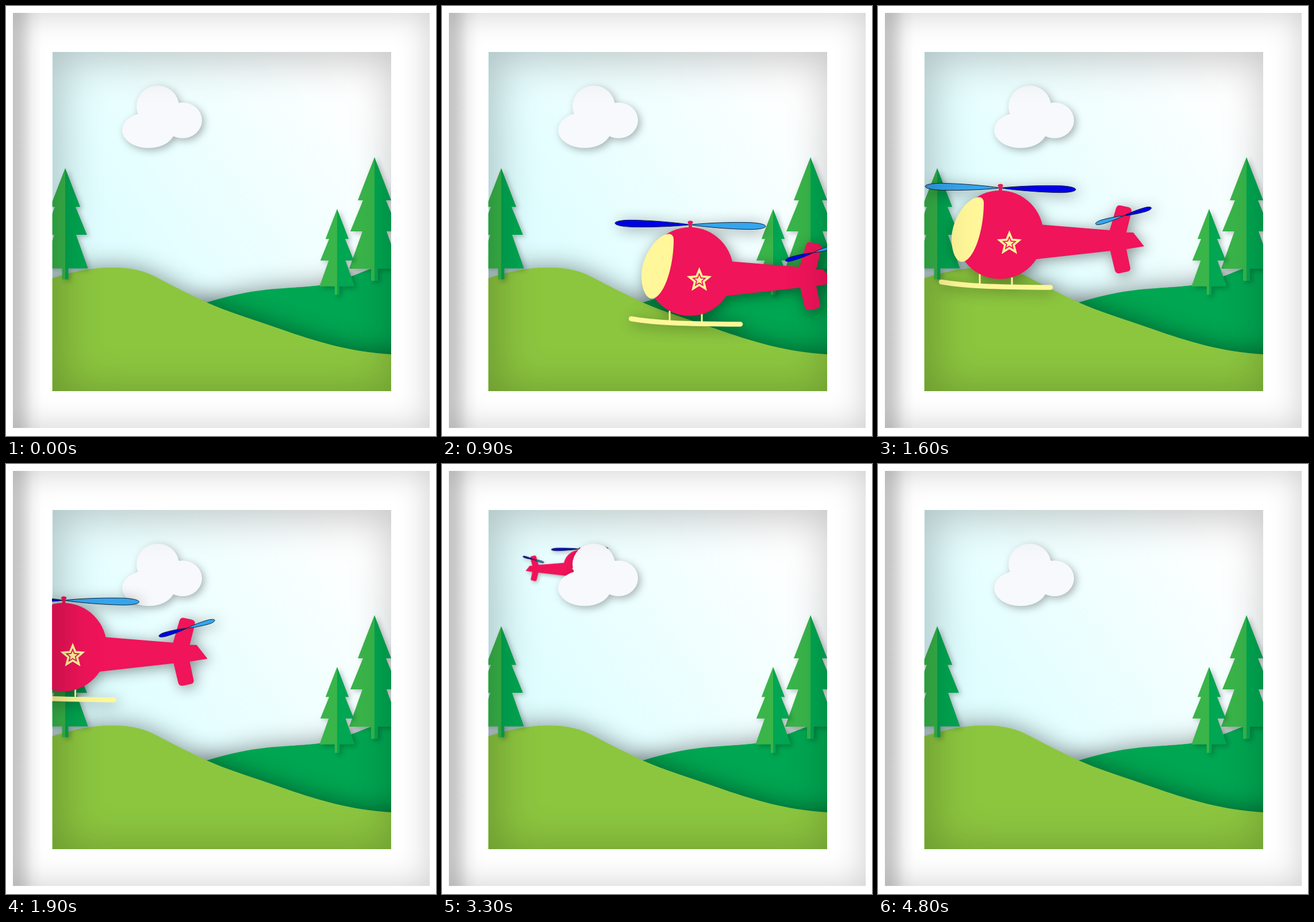
Recreate the animation shown at these times as an HTML page. Size 748x748 px, loop 4.9 s.

```html
<!DOCTYPE html>
<html lang="en">
<head>
<meta charset="utf-8">
<title>Paper helicopter</title>
<style>
  html, body { margin: 0; width: 100%; height: 100%; overflow: hidden; background: #fff; }
  div, svg { position: absolute; }
  #frame {
    left: 12px; top: 12px; width: 725px; height: 722px;
    background: linear-gradient(90deg, rgba(0,0,0,.15) 10px, rgba(0,0,0,.11) 20px, rgba(0,0,0,.03) 34px, transparent 50px) #fff;
    box-shadow: inset 0 0 56px rgba(0,0,0,.2);
  }
  #shade {
    left: 80.5px; top: 79.5px; width: 589.5px; height: 590.5px;
    box-shadow: inset 9px 7px 72px 7px rgba(0,0,0,.23);
  }
  svg { left: 0; top: 0; }
  .hill { filter: drop-shadow(0 0 22px rgba(0,0,0,.45)); }
  .tree { filter: drop-shadow(4px 3px 4px rgba(0,0,0,.25)); }
  .cloud { fill: #f7f9fd; filter: drop-shadow(4px 4px 7px rgba(0,0,0,.3)); }
  #big { filter: drop-shadow(4px 4px 12px rgba(0,0,0,.42)); }
  #small { filter: drop-shadow(2px 3px 3px rgba(0,0,0,.25)); }
</style>
</head>
<body>
<div id="frame"></div>
<svg width="748" height="748" viewBox="0 0 748 748">
  <defs>
    <clipPath id="window"><rect x="80.5" y="79.5" width="589.5" height="590.5"/></clipPath>
    <linearGradient id="sky" x1="0" y1=".75" x2=".9" y2=".1">
      <stop offset=".25" stop-color="#e0feff"/>
      <stop offset="1" stop-color="#fff"/>
    </linearGradient>
    <path id="half" d="M0 0 29 75H20L42 129H21L44 194H6V215H0Z"/>
    <g id="tree">
      <use href="#half" fill="#39b54a" transform="scale(-1 1)"/>
      <use href="#half" fill="#00a651"/>
    </g>
    <path id="blade" d="M0 0C30-4 70-6 100-6C120-6 131-3 131 0C131 3 120 6 100 6C70 6 30 4 0 0Z"
      stroke="#123" stroke-width="1" vector-effect="non-scaling-stroke"/>
    <g id="rotor">
      <use href="#blade" transform="scale(-1 1)" style="fill:var(--left)"/>
      <use href="#blade" style="fill:var(--right)"/>
    </g>
    <path id="star" d="M0-18 4.7-6.5 17.1-5.6 7.6 2.5 10.6 14.6 0 8-10.6 14.6-7.6 2.5-17.1-5.6-4.7-6.5Z"/>
    <!-- Drawn with the mast head at (213, 313) -->
    <g id="copter">
      <g fill="none" stroke="#fff799">
        <path d="M177 466V486M233 466V486" stroke-width="3"/>
        <path d="M110 480C150 487 200 489 300 489.5" stroke-width="8.5" stroke-linecap="round"/>
      </g>
      <use href="#rotor" transform="translate(213 316.5) rotate(1.2)"/>
      <g fill="#f0145a">
        <path d="M403 390 414 352Q416 346 422 347L436 350Q442 352 441 358L432 394H444L463 418 432 423 439 456Q439 461 434 462L420 465Q414 466 412 460L404 426 270 441 280 380Z"/>
        <ellipse cx="212" cy="398" rx="76" ry="77"/>
        <ellipse cx="213" cy="312.5" rx="4.5" ry="3"/>
        <path d="M211 312H215L216.5 324H209.5Z"/>
      </g>
      <path d="M184 342C184 334 178 331 172 333C150 338 128 375 128 405C128 430 137 445 146 445C165 445 184 395 184 342Z" fill="#fff799"/>
      <g transform="translate(228.5 413)">
        <use href="#star" fill="none" stroke="#fff799" stroke-width="3.6"/>
        <use href="#star" fill="#fff799" transform="scale(.48)"/>
      </g>
      <use href="#rotor" transform="translate(427 365) rotate(-16) scale(.385 .6)"/>
    </g>
  </defs>
  <g clip-path="url(#window)">
    <rect x="80" y="79" width="591" height="592" fill="url(#sky)"/>
    <g id="small"><use href="#copter"/></g>
    <g class="cloud">
      <ellipse cx="264" cy="174.500" rx="37" ry="36"/>
      <ellipse cx="307" cy="199" rx="34" ry="31"/>
      <ellipse cx="248" cy="216" rx="46" ry="31"/>
    </g>
    <path class="hill" fill="#00a651" d="M330 522C390 502 430 495 470 492C510 489 530 488 545 486C590 477 610 466 632 458L720 440V720H330Z"/>
    <g class="tree"><use href="#tree" transform="translate(641 263)"/></g>
    <g class="tree"><use href="#tree" transform="translate(576 353) scale(.695)"/></g>
    <path class="hill" fill="#8cc63f" d="M30 492L80 474C110 463 150 455 180 455C215 454 240 460 262 472C290 487 320 502 350 516C385 532 430 545 475 561C540 584 600 602 671 606L720 608V720H30Z"/>
    <g class="tree"><use href="#tree" transform="translate(103 282) scale(.9)"/></g>
    <g id="big"><use href="#copter"/></g>
  </g>
</svg>
<div id="shade"></div>
<script>
  const STEP = 100, STEPS = 49;
  const DARK = '#0000e6', LIGHT = '#35a5ee';
  // Swoop of the mast head: [step, x, y]
  const swoop = [[0, 862, 200], [6, 518, 345], [9, 432, 377], [16, 213, 313], [23, -83, 83], [28, -400, -170]];

  const big = document.querySelector('#big');
  const small = document.querySelector('#small');

  function slope(i, axis) {
    const rate = k => (swoop[k + 1][axis] - swoop[k][axis]) / (swoop[k + 1][0] - swoop[k][0]);
    if (i === 0) return rate(0);
    if (i === swoop.length - 1) return rate(i - 1);
    const before = swoop[i][0] - swoop[i - 1][0], after = swoop[i + 1][0] - swoop[i][0];
    return (rate(i - 1) * after + rate(i) * before) / (before + after);
  }

  // Smooth cubic through the swoop points
  function along(step, axis) {
    let i = 0;
    while (i < swoop.length - 2 && step > swoop[i + 1][0]) i++;
    const span = swoop[i + 1][0] - swoop[i][0];
    const u = (step - swoop[i][0]) / span, v = 1 - u;
    return v * v * (1 + 2 * u) * swoop[i][axis] + u * u * (1 + 2 * v) * swoop[i + 1][axis]
      + span * u * v * (v * slope(i, axis) - u * slope(i + 1, axis));
  }

  function paintBlades(copter, darkLeft) {
    copter.style.setProperty('--left', darkLeft ? DARK : LIGHT);
    copter.style.setProperty('--right', darkLeft ? LIGHT : DARK);
  }

  function place(copter, shown, x, y, sx, sy) {
    copter.style.display = shown ? '' : 'none';
    copter.firstElementChild.setAttribute('transform',
      `translate(${x} ${y}) scale(${sx} ${sy}) translate(-213 -313)`);
  }

  function draw(now) {
    const step = Math.floor(now / STEP) % STEPS;
    const odd = step % 2 === 1;
    place(big, step > 0 && step < 28, along(step, 1), along(step, 2), 1, 1);
    place(small, step > 26 && step < 47, 612.5 + (step - 42) * 41.45, 146.5, -.376, .376);
    paintBlades(big, odd);
    paintBlades(small, !odd);
    requestAnimationFrame(draw);
  }

  const start = performance.now();
  requestAnimationFrame(function tick() {
    draw = (paint => () => paint(Math.max(0, performance.now() - start)))(draw);
    draw();
  });
</script>
</body>
</html>
```
